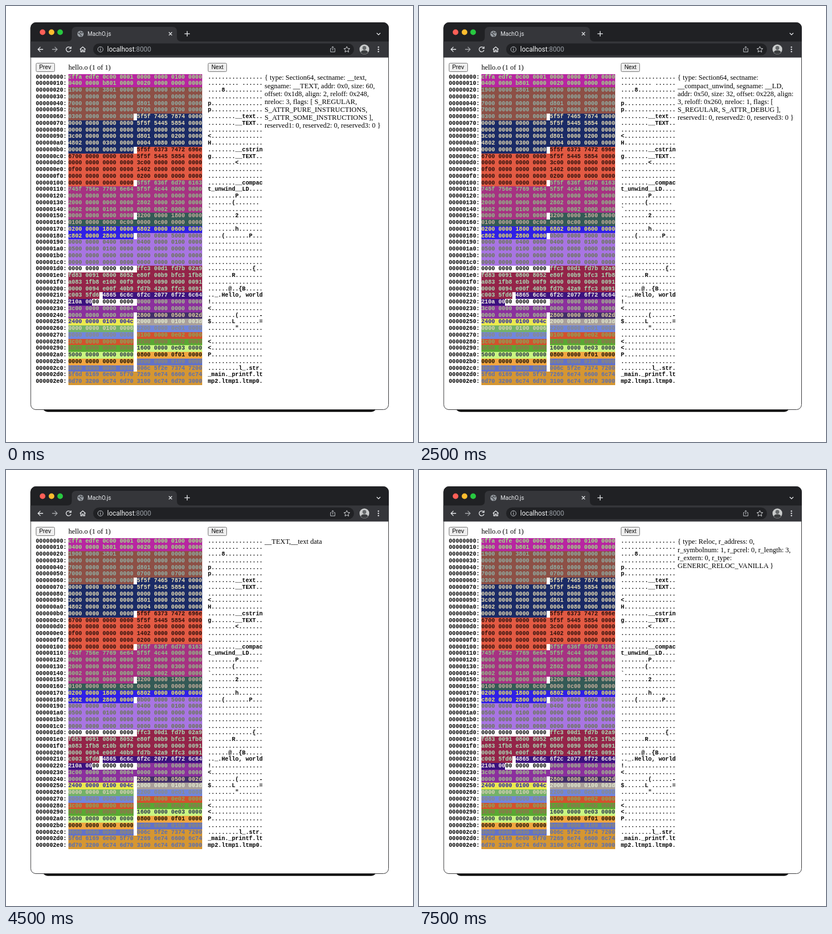
Recreate the animation shown at these times as an HTML page. Size 724x774 px, loop 8000 ms.

```html
<!DOCTYPE html>
<html lang="en">
<head>
<meta charset="utf-8">
<title>MachO.js</title>
<style>
html, body { margin: 0; width: 100%; height: 100%; overflow: hidden; background: #fff; }
body { position: relative; }
body > * { position: absolute; }
svg { left: 0; top: 0; }
.ui { font-family: Roboto, sans-serif; white-space: pre; }
.serif { font: 12.54px/14.17px "Liberation Serif", Tinos, serif; white-space: pre; color: #000; }
.button {
  top: 100.5px; width: 32px; height: 14.5px; border: 1px solid #767676; border-radius: 2.5px;
  background: #efefef; color: #000; text-align: center;
  font: 10.3px/14.5px "Liberation Sans", Arimo, sans-serif;
}
.column { top: 120.6px; font: bold 10.19px/11.76px "Liberation Mono", Cousine, monospace; color: #000; }
.column div { height: 11.76px; white-space: nowrap; }
#hex div { white-space: pre; }
#hex span { display: inline-block; height: 11.76px; vertical-align: top; }
</style>
</head>
<body>
<svg width="724" height="774" viewBox="0 0 724 774" fill="none">
  <rect x="65" y="700" width="594" height="20.5" rx="9" fill="#000"/>
  <rect x="44" y="29.5" width="636.5" height="687" rx="9" fill="#fff" stroke="#3a3a3c"/>
  <path d="M43.5 91V39a10 10 0 0 1 10-10H671a10 10 0 0 1 10 10V91Z" fill="#202124"/>
  <path d="M43.5 63H109q8 0 8-8V45q0-8 8-8H296q8 0 8 8V55q0 8 8 8H681V91.500H43.5Z" fill="#35363a"/>
  <rect x="155" y="66.500" width="464" height="21" rx="10.500" fill="#202124"/>
  <circle cx="65" cy="46.500" r="5" fill="#ff5f57"/>
  <circle cx="81" cy="46.500" r="5" fill="#febc2e"/>
  <circle cx="96.300" cy="46.500" r="5" fill="#28c840"/>
  <circle cx="132.500" cy="49.500" r="5.600" fill="#9aa0a6"/>
  <path d="M128 48l3 1 1 2 2 1-1 2.500M133 45l-1 2 3 1 2-1" stroke="#44464a" stroke-width="1.400"/>
  <g stroke="#e8eaed" stroke-width="1.300">
    <path d="M289.700 46.500l5.600 5.600m0-5.600l-5.600 5.600M317.500 49.300h9.600m-4.800-4.800v9.600M659.500 48l3.200 3.200 3.200-3.200"/>
    <path d="M66 77h-9m4.300-4.400l-4.400 4.400 4.400 4.400"/>
    <path d="M82 77h9m-4.300-4.400l4.400 4.400-4.400 4.400" stroke="#a5a7ab"/>
    <path d="M114.700 74a4.400 4.400 0 1 0 .9 4.300M115.700 72v3.300h-3.500"/>
    <path d="M131.500 77l5-4.500 5 4.500M133 76v5.400h2.400v-3.300h2.200v3.300h2.400V76"/>
    <circle cx="168" cy="77" r="4.700" stroke="#bdc1c6" stroke-width="1"/>
    <path d="M168 76.300v3.200M168 74v1.100" stroke="#bdc1c6"/>
    <path d="M579 75.500h-1.700v6h7.800v-6h-1.700M581.200 79v-7m-2 1.800l2-2 2 2" stroke="#bdc1c6" stroke-width="1"/>
    <path d="M606.300 71.800l1.600 3.500 3.700.4-2.800 2.500.8 3.700-3.300-1.900-3.300 1.900.8-3.700-2.800-2.500 3.700-.4Z" stroke="#d5d7da" stroke-width="1"/>
  </g>
  <circle cx="637.500" cy="77" r="8.700" fill="#c9cbcb"/>
  <circle cx="637.500" cy="74.500" r="3.400" fill="#65686a"/>
  <path d="M631 82.600q1-4 6.500-4t6.500 4a8.700 8.700 0 0 1-13 0Z" fill="#3c3e40"/>
  <g fill="#e8eaed"><circle cx="662.500" cy="73" r="1.200"/><circle cx="662.500" cy="77" r="1.200"/><circle cx="662.500" cy="81" r="1.200"/></g>
</svg>
<div class="ui" style="left:145px;top:42.500px;font-size:10.100px;line-height:14px;color:#e8eaed">MachO.js</div>
<div class="ui" style="left:180px;top:70px;font-size:11.900px;line-height:14px;color:#f1f3f4">localhost<span style="color:#9aa0a6">:8000</span></div>
<div class="button" style="left:52.500px">Prev</div>
<div class="serif" style="left:111px;top:101.500px">hello.o (1 of 1)</div>
<div class="button" style="left:359px">Next</div>
<div class="column" id="address" style="left:53px"></div>
<div class="column" id="hex" style="left:110.700px"></div>
<div class="column" id="ascii" style="left:359px"></div>
<div class="serif" id="details" style="left:460px;top:120.400px"></div>
<script>
// One line per 16 bytes; each word is padded to four digits, missing words are zero.
const dump = `cffa edfe 0c00 0001 0 0 0100
0400 0 b801 0 0020
1900 0 3801

7000 0 0 0 d801
7000 0 0 0 0700 0 0700
0300 0 0 0 5f5f 7465 7874
0 0 0 0 5f5f 5445 5854

3c00 0 0 0 d801 0 0200
4802 0 0300 0 0004 0080
0 0 0 0 5f5f 6373 7472 696e
6700 0 0 0 5f5f 5445 5854
0 0 0 0 3c00
0f00 0 0 0 1402
0 0 0 0 0200
0 0 0 0 5f5f 636f 6d70 6163
745f 756e 7769 6e64 5f5f 4c44
0 0 0 0 5000
2000 0 0 0 2802 0 0300
6002 0 0100 0 0 0002
0 0 0 0 3200 0 1800
0100 0 0 0c00 0 0c00
0200 0 1800 0 6802 0 0600
c802 0 2800 0 0b00 0 5000
0 0 0400 0 0400 0 0100
0500 0 0100


0 0 0 0 ffc3 00d1 fd7b 02a9
fd83 0091 0800 8052 e80f 00b9 bfc3 1fb8
a083 1fb8 e10b 00f9 0 0090 0 0091
0 0094 e00f 40b9 fd7b 42a9 ffc3 0091
c003 5fd6 4865 6c6c 6f2c 2077 6f72 6c64
210a
3c00 0 0 0004
0 0 0 0 2800 0 0500 002d
2400 0 0100 004c 2000 0 0100 003d
0 0 0100 0006 2200 0 0e01
0 0 0 0 0100 0 0e02
3c00 0 0 0 1c00 0 0e02
3c00 0 0 0 1600 0 0e03
5000 0 0 0 0800 0 0f01
0 0 0 0 0e00 0 0100
0 0 0 0 006c 5f2e 7374 7200
5f6d 6169 6e00 5f70 7269 6e74 6600 6c74
6d70 3200 6c74 6d70 3100 6c74 6d70 3000`;

// First byte, background, text colour
const regions = [
  [0x000, '#b826a1', '#9be384'],
  [0x020, '#8d5046', '#8fb2a8'],
  [0x068, '#1b2b66', '#e9dfb4'],
  [0x0b8, '#e25a43', '#2a100c'],
  [0x108, '#a63282', '#8fc487'],
  [0x158, '#345a56', '#c8b09c'],
  [0x170, '#3020e6', '#f0ee58'],
  [0x188, '#a875e2', '#66784f'],
  [0x1d0, '#ffffff', '#000000'],
  [0x1d8, '#942449', '#a9dcb5'],
  [0x214, '#3c127f', '#f0f0e0'],
  [0x223, '#ffffff', '#000000'],
  [0x228, '#8b309d', '#a2c68e'],
  [0x248, '#432f6a', '#dfcf9c'],
  [0x250, '#ebe94e', '#2524a8'],
  [0x258, '#a99f9b', '#e3ecd0'],
  [0x260, '#74b268', '#dad0b8'],
  [0x268, '#7186dc', '#8b8a80'],
  [0x278, '#d2522e', '#86a95c'],
  [0x288, '#59a733', '#9a6a55'],
  [0x298, '#c9f581', '#26304c'],
  [0x2a8, '#f1a640', '#181008'],
  [0x2b8, '#6272c8', '#928a6c'],
  [0x2c8, '#d59632', '#566fb8'],
];

const $ = id => document.getElementById(id);
const regionAt = byte => regions.findLast(region => region[0] <= byte);

function add(parent, tag, text = '') {
  const node = parent.appendChild(document.createElement(tag));
  node.textContent = text;
  return node;
}

function addHexRow(bytes, start) {
  const row = add($('hex'), 'div');
  let span, current;
  bytes.forEach((byte, i) => {
    const region = regionAt(start + i);
    const gap = i && i % 2 === 0 ? ' ' : '';
    if (region !== current) {
      if (gap) row.append(gap);
      span = add(row, 'span');
      span.style.background = region[1];
      span.style.color = region[2];
      current = region;
    } else {
      span.textContent += gap;
    }
    span.textContent += byte;
  });
}

dump.split('\n').forEach((line, i) => {
  const words = line.split(' ');
  const digits = Array.from({ length: 8 }, (_, k) => (words[k] || '').padStart(4, '0')).join('');
  const bytes = digits.match(/../g);
  const printable = bytes.map(byte => {
    const code = parseInt(byte, 16);
    return code >= 32 && code < 127 ? String.fromCharCode(code) : '.';
  });
  add($('address'), 'div', (i * 16).toString(16).padStart(8, '0') + ':');
  addHexRow(bytes, i * 16);
  add($('ascii'), 'div', printable.join(''));
});

const segment = `{ cmd: LC_SEGMENT_64, size: 312,
segname: , vmaddr: 0x0, vmsize: 0,
fileoff: 0x70, filesize: 472, maxprot:
0x70, initprot: 0x0, nsects: 7, flags: [
SG_HIGHVM, SG_FVMLIB,
SG_NORELOC ] }`;

const reloc = (address, symbol, pcrel, length, extern, type) => `{ type: Reloc, r_address: ${address},
r_symbolnum: ${symbol}, r_pcrel: ${pcrel}, r_length: ${length},
r_extern: ${extern}, r_type:
GENERIC_RELOC_${type}`;

// Description of the hovered region, one per half second
const details = [
`{ type: Section64, sectname: __text,
segname: __TEXT, addr: 0x0, size: 60,
offset: 0x1d8, align: 2, reloff: 0x248,
nreloc: 3, flags: [ S_REGULAR,
S_ATTR_PURE_INSTRUCTIONS,
S_ATTR_SOME_INSTRUCTIONS ],
reserved1: 0, reserved2: 0, reserved3: 0 }`,
segment,
`{ magic: 0xfeedfacf, cputype: ARM64,
cpusubtype: 0, filetype: MH_OBJECT,
ncmds: 4, sizeofcmds: 440, flags: [
MH_SUBSECTIONS_VIA_SYMBOLS ]
}`,
segment,
`{ type: Section64, sectname: __cstring,
segname: __TEXT, addr: 0x3c, size: 15,
offset: 0x214, align: 0, reloff: 0x0,
nreloc: 0, flags: [
S_CSTRING_LITERALS ], reserved1: 0,
reserved2: 0, reserved3: 0 }`,
`{ type: Section64, sectname:
__compact_unwind, segname: __LD,
addr: 0x50, size: 32, offset: 0x228, align:
3, reloff: 0x260, nreloc: 1, flags: [
S_REGULAR, S_ATTR_DEBUG ],
reserved1: 0, reserved2: 0, reserved3: 0 }`,
`{ cmd: LC_BUILD_VERSION, size: 24,
platform: MACOS, minos: 12.0.0, sdk:
12.0.0, ntools: 0 }`,
`{ cmd: LC_SYMTAB, size: 24, symoff:
0x268, nsyms: 6, stroff: 0x2c8, strsize: 40
}`,
`{ cmd: LC_DYSYMTAB, size: 80,
ilocalsym: 0, nlocalsym: 4, iextdefsym: 4,
nextdefsym: 1, iundefsym: 5, nundefsym:
1, tocoff: 0x0, ntoc: 0, modtaboff: 0x0,
nmodtab: 0, extrefsymoff: 0x0,
nextrefsyms: 0, indirectsymoff: 0x0,
nindirectsyms: 0, extreloff: 0x0, nextrel: 0,
locreloff: 0x0, nlocrel: 0 }`,
'__TEXT,__text data',
'__TEXT,__cstring data',
'__LD,__compact_unwind data',
reloc(40, 5, 1, 2, 1, 'SECTDIFF }'),
reloc(36, 1, 0, 2, 1, 'LOCAL_SECTDIFF\n}'),
reloc(32, 1, 1, 2, 1, 'PB_LA_PTR }'),
reloc(0, 1, 0, 3, 0, 'VANILLA }'),
];

let shown = -1;
function draw() {
  const step = Math.floor(performance.now() % 8000 / 500);
  if (step !== shown) $('details').textContent = details[shown = step];
  requestAnimationFrame(draw);
}
draw();
</script>
</body>
</html>
```
